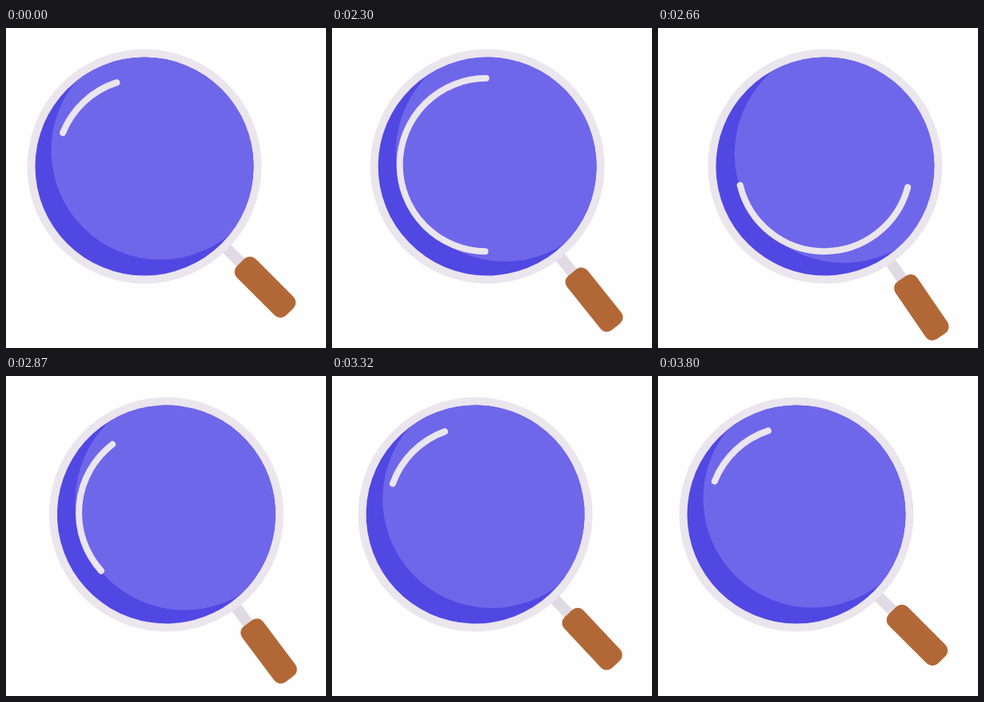
An HTML page that plays this animation: 400 px wide and 400 px high, repeating every 3.83 s.

```html
<!DOCTYPE html>
<html lang="en">
<head>
<meta charset="utf-8">
<title>Magnifying glass</title>
<style>
  html, body { margin: 0; width: 100%; height: 100%; overflow: hidden; background: #fefefe; }
  svg { display: block; width: 100vw; height: 100vh; }
</style>
</head>
<body>
<svg viewBox="0 0 400 400">
  <defs>
    <clipPath id="lens"><circle r="136.5"/></clipPath>
  </defs>
  <g id="glass" transform="translate(173 173)">
    <g transform="rotate(45)">
      <rect x="140" y="-7" width="40" height="14" fill="#e0dae4"/>
      <rect x="170" y="-16.5" width="87" height="33" rx="10" fill="#b26836"/>
    </g>
    <circle r="146.5" fill="#ebe5ed"/>
    <circle r="136.5" fill="#5148e3"/>
    <g clip-path="url(#lens)">
      <circle cx="20" cy="-20" r="136.5" fill="#6f67ea"/>
    </g>
    <path id="shine" fill="none" stroke="#ebe5ed" stroke-width="8" stroke-linecap="round"/>
  </g>
</svg>
<script>
(() => {
  const LOOP = 3830, FIRST = 2030, STEP = 30;
  const SWAY_START = 2000, SWAY_PEAK = 2575, SWAY = 36.9, TILT = 0.297;
  const SPIN_START = 2025, SPIN_END = 3080, OVERSHOOT = 12.8;
  const RADIUS = 108.2, TAIL = 201.8, HEAD = 252.2;
  const glass = document.getElementById('glass');
  const shine = document.getElementById('shine');

  // Smoothstep, with its middle pulled earlier as power grows.
  function ease(u, power) {
    const s = 1 - (1 - u) ** power;
    return s * s * (3 - 2 * s);
  }

  function sway(t) {
    return t < SWAY_PEAK
      ? SWAY * ease((t - SWAY_START) / (SWAY_PEAK - SWAY_START), 1.08)
      : SWAY * (1 - ease((t - SWAY_PEAK) / (LOOP - SWAY_PEAK), 1.5));
  }

  // Two clockwise turns along a cubic, then a damped swing back to rest.
  function spin(t, a, b) {
    const late = t - SPIN_END;
    if (late > 0) return OVERSHOOT * Math.exp(-late / 200) * Math.cos(Math.PI * late / 240);
    const u = (t - SPIN_START) / (SPIN_END - SPIN_START), w = 1 - u;
    return (720 + OVERSHOOT) * (3 * w * w * u * a + 3 * w * u * u * b + u ** 3);
  }

  function point(deg) {
    const angle = deg * Math.PI / 180;
    return `${-1.5 + RADIUS * Math.cos(angle)} ${-1.8 + RADIUS * Math.sin(angle)}`;
  }

  function draw(now) {
    const time = now % LOOP;
    let x = 0, tail = TAIL, head = HEAD;
    if (time >= FIRST) {
      const t = FIRST + Math.floor((time - FIRST) / STEP) * STEP;
      x = sway(t);
      tail += spin(t, 0.43, 0.86);
      head += spin(t, 0.82, 0.92);
    }
    const large = head - tail > 180 ? 1 : 0;
    glass.setAttribute('transform', `translate(${173 + x} 173) rotate(${x * TILT})`);
    shine.setAttribute('d', `M${point(tail)}A${RADIUS} ${RADIUS} 0 ${large} 1 ${point(head)}`);
  }

  function tick() {
    draw(performance.now());
    requestAnimationFrame(tick);
  }
  tick();
})();
</script>
</body>
</html>
```
